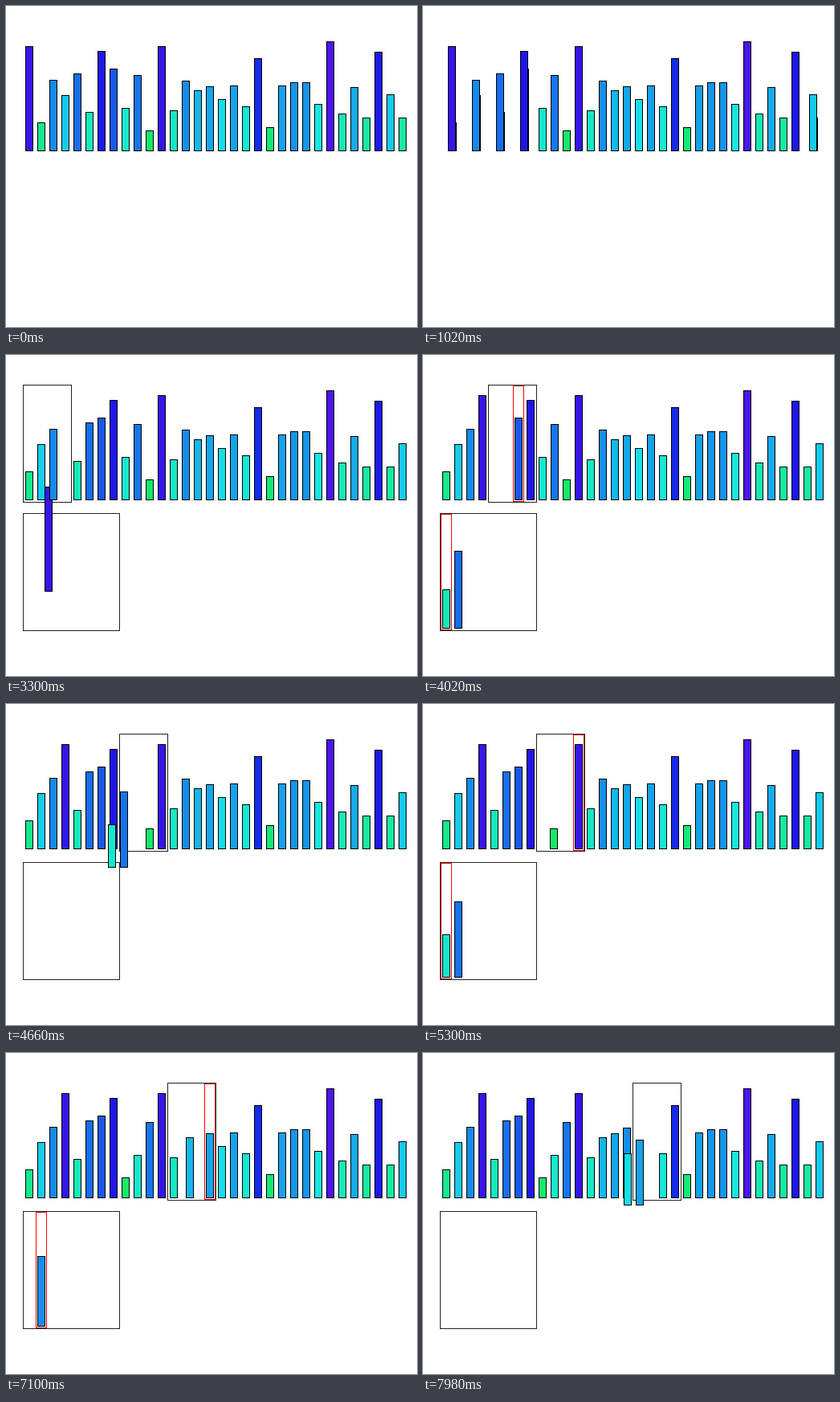
An HTML page with a canvas for the animation above (8 s loop, 512 px wide and 400 px high).

```html
<!DOCTYPE html>
<html lang="en">
<head>
<meta charset="utf-8">
<title>Merge sort</title>
<style>
  html, body { margin: 0; width: 100%; height: 100%; overflow: hidden; background: #fff; }
  canvas { display: block; }
</style>
</head>
<body>
<canvas id="stage" width="512" height="400"></canvas>
<script>
const ctx = document.getElementById('stage').getContext('2d');
const LOOP = 8000, SWAP_START = 500, DOWN = 490, UP = 266, GAP = 40, COMPARE = 40;
const PITCH = 15, ROW = 160, BASE = 181;

const heights = [131, 36, 89, 70, 97, 49, 125, 103, 54, 95, 26, 131, 51, 88, 76, 81,
  65, 82, 56, 116, 30, 82, 86, 86, 59, 137, 47, 80, 42, 124, 71, 42];
// Start of each four-bar merge; the last entry closes the fifth one.
const blockStarts = [1732, 3531, 4590, 6077, 7952, 9900];

const place = (slot, row = 0) => ({ x: 24 + slot * PITCH, y: row * ROW });
const bars = heights.map((height, slot) => ({ height, slot, home: place(slot), moves: [] }));
const marks = [];   // red frames around the heads of both runs

function move(bar, to, start, duration) {
  const from = bar.moves.length ? bar.moves.at(-1).to : bar.home;
  bar.moves.push({ from, to, start, duration });
}

function sortPairs() {
  for (let i = 0; i < bars.length; i += 2) {
    const [a, b] = [bars[i], bars[i + 1]];
    if (a.height <= b.height) continue;
    const duration = blockStarts[0] - GAP - SWAP_START;
    move(a, place(i + 1), SWAP_START, duration);
    move(b, place(i), SWAP_START, duration);
    [bars[i], bars[i + 1]] = [b, a];
  }
  bars.forEach((bar, i) => bar.slot = i);
}

function mergeBlock(block) {
  const first = block * 4, start = blockStarts[block];
  const left = bars.slice(first, first + 2), right = bars.slice(first + 2, first + 4);
  left.forEach((bar, i) => move(bar, place(i, 1), start, DOWN));

  const order = [];
  let l = 0, r = 0;
  while (l < 2) {
    const fromLeft = r === 2 || left[l].height <= right[r].height;
    order.push({ bar: fromLeft ? left[l++] : right[r++], fromLeft, l, r });
  }
  const shifts = order.filter(step => !step.fromLeft).length;
  const spare = blockStarts[block + 1] - GAP - start - DOWN - 2 * UP;

  let time = start + DOWN;
  marks.push({ time, left: 0, right: first + 2 });
  order.forEach((step, i) => {
    const duration = step.fromLeft ? UP : spare / shifts;
    move(step.bar, place(first + i), time, duration);
    marks.push(step.l < 2 && step.r < 2
      ? { time: time + (i ? 0 : COMPARE), left: step.l, right: first + 2 + step.r }
      : { time });
    time += duration;
  });
}

function position(bar, t) {
  const current = bar.moves.findLast(m => t >= m.start);
  if (!current) return bar.home;
  const { from, to, start, duration } = current;
  const p = Math.min(1, (t - start) / duration);
  return { x: from.x + (to.x - from.x) * p, y: from.y + (to.y - from.y) * p };
}

function outline(x, y, width, height, color) {
  ctx.strokeStyle = color;
  ctx.strokeRect(x + 0.5, y + 0.5, width, height);
}

function draw(t) {
  ctx.fillStyle = '#fff';
  ctx.fillRect(0, 0, 512, 400);

  const block = blockStarts.findLastIndex(start => t >= start - GAP);
  if (block >= 0) {
    outline(21 + block * 4 * PITCH, 37, 60, 146, '#222');
    outline(21, 37 + ROW, 120, 146, '#222');
  }
  const mark = marks.findLast(m => t >= m.time);
  if (mark && mark.right !== undefined) {
    outline(22 + mark.left * PITCH, 38 + ROW, 13, 144, '#f00');
    outline(22 + mark.right * PITCH, 38, 13, 144, '#f00');
  }
  for (const bar of bars) {
    const at = position(bar, t);
    const x = Math.round(at.x), y = Math.round(at.y) + BASE - bar.height;
    ctx.fillStyle = `hsl(${118 + bar.height}, 83%, 50%)`;
    ctx.fillRect(x, y, 10, bar.height);
    outline(x, y, 9, bar.height - 1, '#000');
  }
}

sortPairs();
for (let block = 0; block < 5; block++) mergeBlock(block);

const begin = performance.now();
function frame() {
  draw((performance.now() - begin) % LOOP);
  requestAnimationFrame(frame);
}
draw(0);
requestAnimationFrame(frame);
</script>
</body>
</html>
```
